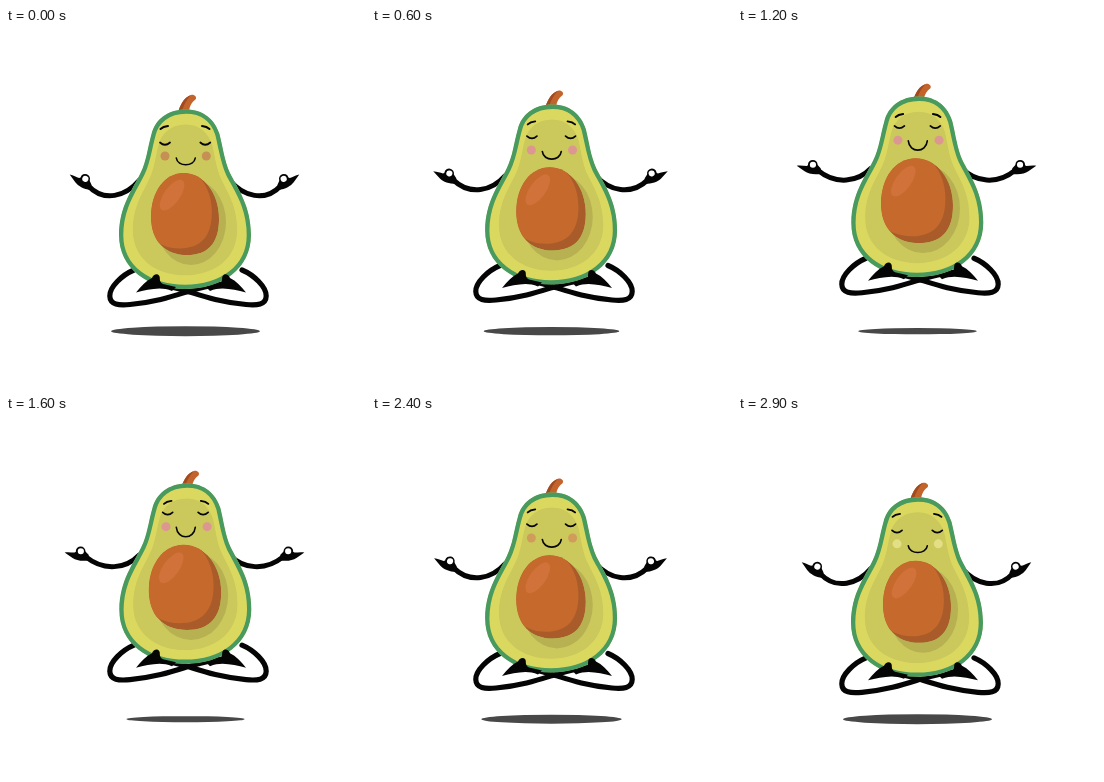
An HTML page with a canvas for the animation above (3000 ms loop, 360 by 360 pixels).

```html
<!DOCTYPE html>
<html lang="en">
<head>
<meta charset="utf-8">
<title>Meditating avocado</title>
<style>
  html, body { margin: 0; width: 100%; height: 100%; overflow: hidden; background: #fff; }
  canvas { display: block; width: 360px; height: 360px; }
</style>
</head>
<body>
<canvas id="stage"></canvas>
<script>
const LOOP = 3000, STEP = 100;
const INK = '#050505';
const canvas = document.getElementById('stage');
const ctx = canvas.getContext('2d');
const ratio = window.devicePixelRatio || 1;
canvas.width = canvas.height = 360 * ratio;

const BODY = new Path2D(
  'M180 81.5C198 81.5 209 92 213.5 106C217 120 218.5 133 224 145C232 161 245 178 245 207' +
  'C245 241 216 261 179 261C142 261 113 241 113 207C113 178 127 161 134.5 145' +
  'C140.5 133 141.5 120 145.5 106C149 92 161 81.5 180 81.5Z');
const STEM = new Path2D('M172.5 83C175 75 179 69 185 67C188 66 191.5 69 189.5 71.5C186 74 184 77 183 83Z');
const STEM_SHADE = new Path2D('M172.5 83C175 75 179 69 185 67C181 71 178 76 176 83Z');
const SEED = new Path2D('M-.04-1C.56-1 1-.5 1 .12C1 .72 .66 1 .06 1C-.6 1-1 .66-1 .06C-1-.54-.6-1-.04-1Z');
const LEG = new Path2D('M128 242C116 247 103.5 259 103.8 268C104 277 113 277.5 124 276.5C150 274 166 268.5 182 263.5C194 260 204 257 216 256');
const FOOT = new Path2D('M130 264.5C135 258 140 253 146 250C147 247 151 245 153 247.5C155 250 152 253 157 256L170 259L166 263C154 258 142 262 130 264.5Z');
const HAND = new Path2D('M4 3.5C-3 5-9 4-13 1.5L-21-4C-17-4.5-14-4-11-4L-8-6L-2-7L3-2Z');

// Cheek tint changes in hard steps: [start ms, colour]
const TINTS = [[0, '#c68f54'], [200, '#b6b28c'], [600, '#dc9890'], [2200, '#d09c5a'], [2700, '#e2df84']];

const wave = ms => (1 - Math.cos(2 * Math.PI * ms / LOOP)) / 2;

function fill(path, color) {
  ctx.fillStyle = color;
  ctx.fill(path);
}

function stroke(path, color, width) {
  ctx.strokeStyle = color;
  ctx.lineWidth = width;
  ctx.stroke(path);
}

function ellipse(x, y, rx, ry, color, turn = 0) {
  ctx.beginPath();
  ctx.ellipse(x, y, rx, ry, turn, 0, 2 * Math.PI);
  ctx.fillStyle = color;
  ctx.fill();
}

function group(draw) {
  ctx.save();
  draw();
  ctx.restore();
}

function mirrored(axis, draw) {
  group(draw);
  group(() => {
    ctx.translate(2 * axis, 0);
    ctx.scale(-1, 1);
    draw();
  });
}

function arm(p, h) {
  const x = 82 - 2.5 * h, y = 157.5 - 17 * p;
  stroke(new Path2D(`M133 ${152.5 - 13.5 * p}C120 ${168 - 15.5 * p} 98 ${175 - 19.5 * p} ${x} ${y}`), INK, 5);
  ctx.translate(x, y);
  ctx.rotate((1 - h) * 0.36);
  fill(HAND, INK);
  ellipse(-5, -5.5, 4.8, 4.6, INK);
  ellipse(-4.8, -5.3, 3.1, 3, '#fff');
}

function scaledBody(sx, sy, color) {
  group(() => {
    ctx.translate(179, 175);
    ctx.scale(sx, sy);
    ctx.translate(-179, -175);
    fill(BODY, color);
  });
}

function body(p) {
  ctx.translate(179, 261 - 13.2 * p);
  ctx.transform(1, 0, -0.006 * p, 1 + 0.006 * p, 0, 0);
  ctx.translate(-179, -261);
  ctx.clip(BODY);
  fill(BODY, '#dbd860');
  scaledBody(0.79, 0.84, '#cbc85c');
  stroke(BODY, '#489a5e', 8.6);
}

function seed(p) {
  const x = 179, y = 186 - 14.8 * p, rx = 34 + 2.2 * p, ry = 41 + 1.6 * p;
  ellipse(x + 6, y + 8, rx + 1, ry + 2, '#b7b152');
  ctx.translate(x, y);
  ctx.scale(rx, ry);
  ctx.clip(SEED);
  fill(SEED, '#a95b2a');
  ctx.translate(-0.21, -0.16);
  fill(SEED, '#c5692d');
  ctx.translate(-0.17, -0.3);
  ctx.scale(1 / rx, 1 / ry);
  ellipse(0, 0, 18, 8, '#d0723a', -0.95);
}

function face(p, tint) {
  const eye = 116 - 18.3 * p, brow = 100 - 13.3 * p, mouth = 130 - 19 * p;
  for (const x of [159 + p, 200.3 + p * 0.8]) ellipse(x, 128 - 17.5 * p, 4.5, 4.5, tint);
  for (const x of [159 + 2.7 * p, 199.3 - 2.2 * p]) {
    stroke(new Path2D(`M${x - 5} ${eye - 1.5}Q${x} ${eye + 3} ${x + 5} ${eye - 1.5}`), INK, 1.7);
  }
  const l = 158 + 3.5 * p, r = 200 - 1.2 * p;
  stroke(new Path2D(`M${l - 3.5} ${brow + 1}Q${l - 1} ${brow - 1.5} ${l + 4} ${brow - 2}`), INK, 1.9);
  stroke(new Path2D(`M${r - 4} ${brow - 2}Q${r + 1} ${brow - 1.5} ${r + 3.5} ${brow + 1}`), INK, 1.9);
  const dip = mouth + 9 + 3.8 * p;
  stroke(new Path2D(`M170.3 ${mouth}C171.5 ${dip} 188 ${dip} 189.3 ${mouth}`), INK, 1.6);
}

function render(ms) {
  const p = wave(ms);
  const lead = wave(ms + 75); // hands and ground shadow run slightly ahead
  const tint = TINTS.filter(([start]) => start <= ms).pop()[1];

  ctx.setTransform(ratio, 0, 0, ratio, 0, 0);
  ctx.fillStyle = '#fff';
  ctx.fillRect(0, 0, 360, 360);
  ctx.lineCap = ctx.lineJoin = 'round';

  ellipse(179.5, 303.2, 74.5 - 16 * lead, 5 - 2 * lead, '#484848');
  mirrored(178.5, () => arm(p, lead));
  group(() => {
    ctx.translate(0, -13 * p);
    mirrored(182, () => stroke(LEG, INK, 5.2));
  });
  group(() => {
    ctx.translate(3 * p, -12.2 * p);
    fill(STEM, '#c4642d');
    fill(STEM_SHADE, '#a04c20');
  });
  group(() => body(p));
  group(() => seed(p));
  face(p, tint);
  group(() => {
    ctx.translate(0, -13 * p);
    mirrored(185, () => fill(FOOT, INK));
  });
}

const begin = performance.now();
function tick() {
  const ms = (performance.now() - begin) % LOOP;
  render(Math.floor(ms / STEP) * STEP);
  requestAnimationFrame(tick);
}
tick();
</script>
</body>
</html>
```
